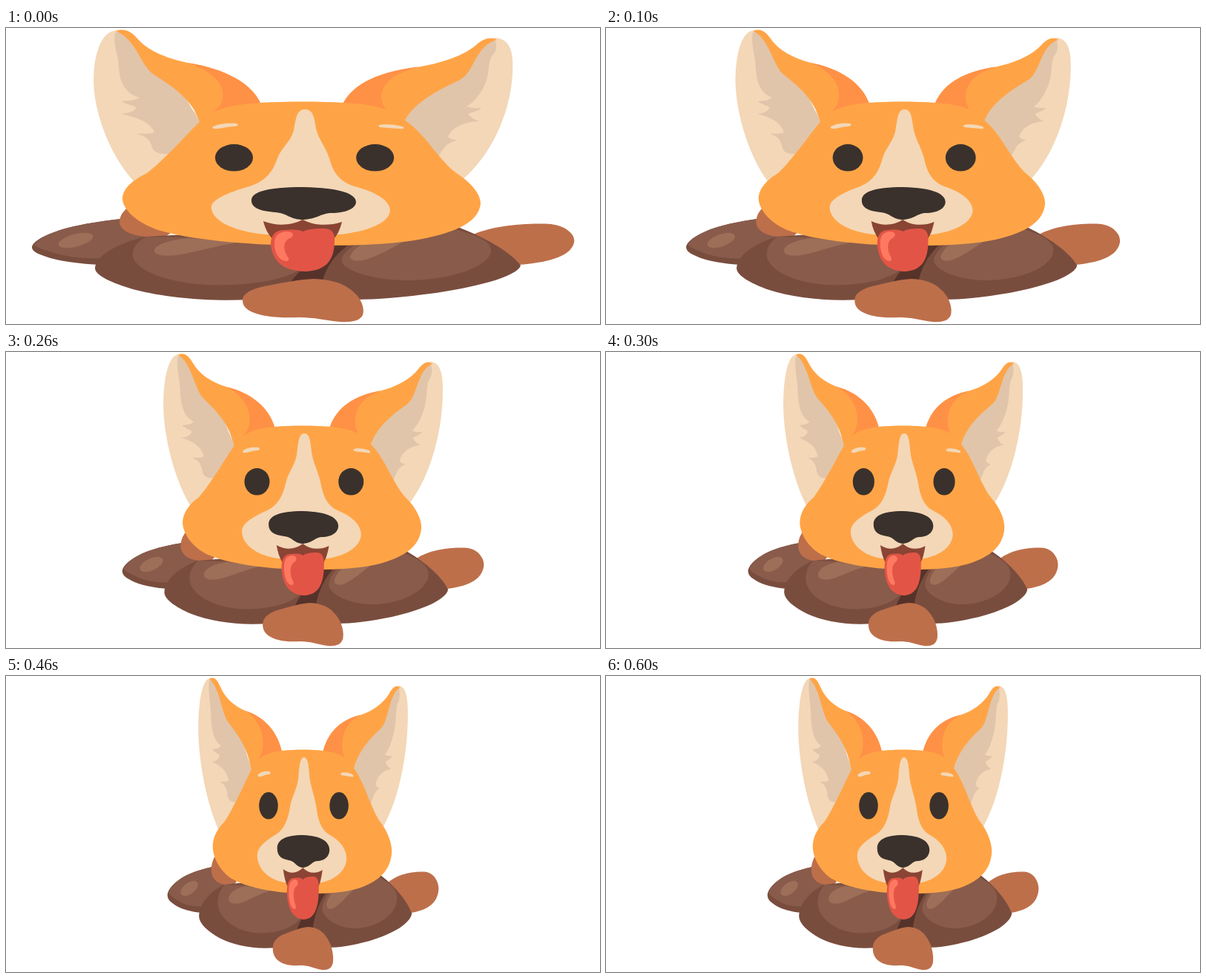
Animation, 801 px wide and 400 px high, one loop 700 ms. Source, as an HTML page with a canvas:

```html
<!DOCTYPE html>
<html lang="en">
<head>
<meta charset="utf-8">
<title>Puppy squeeze</title>
<style>
  html, body { margin: 0; width: 100%; height: 100%; overflow: hidden; background: #fff; }
  canvas { display: block; }
</style>
</head>
<body>
<canvas id="stage" width="801" height="400"></canvas>
<script>
const ctx = document.getElementById('stage').getContext('2d');
const W = 801, H = 400, STEP = 100, STEPS = 7;

const orange = '#ffa446', deepOrange = '#ff9147', cream = '#f3d7b7', shade = '#e0c5ab';
const soil = '#794d3e', soilLit = '#895b4b', soilShine = '#9d6f58', soilDark = '#56332a';
const rust = '#bd6f4a', black = '#3a312c', mouth = '#8a4434', tongue = '#e25546', tongueLit = '#ff7961';

const parts = [];
const add = (color, d) => parts.push([color, new Path2D(d)]);
function oval(color, x, y, rx, ry, turn = 0) {
  const p = new Path2D();
  p.ellipse(x, y, rx, ry, turn, 0, Math.PI * 2);
  parts.push([color, p]);
}

// Soil and stones
add(soil, 'M35 297C34 286 68 273 92 268C115 263 135 260 156 258L240 290L150 320C118 321 82 317 60 311C45 306 36 303 35 297Z');
add(soilLit, 'M38 293C44 283 70 273 92 268C115 263 135 260 156 258L230 290L150 309C115 314 84 310 65 304C50 299 42 297 38 293Z');
oval(soilShine, 94, 287, 24, 8.5, -0.25);
add(rust, 'M172 238C155 246 148 262 157 271C166 280 185 284 215 282L260 250Z');
add(rust, 'M626 281C650 268 700 263 735 265C757 268 768 280 766 290C762 306 740 316 692 320L640 310Z');
add(soil, 'M120 325C121 308 146 293 187 282L300 276L612 270C640 281 680 301 694 321C690 334 646 348 580 358C535 364 500 367 470 367L330 367C270 370 215 364 175 354C140 344 121 334 120 325Z');
add(soilLit, 'M189 282C174 290 168 302 172 312C181 330 220 344 270 347C318 349 366 343 392 329L410 285Z');
add(soilDark, 'M384 343C393 331 410 314 438 292L463 292C444 306 431 323 426 345Z');
add(soilLit, 'M480 288C462 296 450 309 453 317C462 331 503 342 548 341C598 339 640 326 652 308C659 293 648 284 606 272Z');
add(soilShine, 'M200 300C203 291 225 286 245 284L318 289C290 293 265 300 242 305C220 309 199 309 200 300Z');
add(soilShine, 'M464 309C466 302 474 295 484 291L536 289C520 297 502 308 485 313C474 316 464 315 464 309Z');
add(rust, 'M319 367C320 357 336 351 354 348C375 344 393 340 415 339C440 340 455 345 468 356C480 366 484 380 481 388C477 396 465 398 450 397C430 395 415 391 395 391C365 392 345 390 330 383C320 378 319 372 319 367Z');

// Left ear
add(cream, 'M152 3C128 2 118 36 118 72C119 118 142 174 172 207L265 150V125Z');
add(shade, 'M147 7C145 19 148 28 150 38C153 50 151 64 158 77C163 86 171 92 180 94C172 99 164 98 156 99C163 104 172 104 176 108C170 115 162 115 155 116C175 120 195 127 200 141C192 144 184 142 176 143C193 147 195 154 198 164C203 170 212 171 221 170C233 153 248 141 263 130L222 60L152 4Z');
add(orange, 'M148 4C160 0 169 5 176 13C190 30 216 41 245 47C296 55 331 75 343 101L300 130L262 130C252 95 222 78 198 62C180 48 176 16 148 4Z');
add(deepOrange, 'M245 47C296 55 331 75 343 101L279 113C293 105 295 91 290 79C283 64 265 54 245 47Z');

// Right ear
add(cream, 'M658 13C680 14 685 32 683 62C680 118 652 175 614 206L530 140Z');
add(shade, 'M659 15C663 26 661 32 655 38C649 48 653 62 645 78C638 92 630 101 621 106C628 109 635 108 641 108C636 113 629 113 623 116C627 122 633 124 638 126C616 127 601 135 596 147C600 151 604 151 608 151C600 155 594 156 590 163L583 173L535 126L570 75Z');
add(orange, 'M662 16C654 11 643 15 635 22C617 38 588 47 555 53C504 59 470 74 455 101L500 130L537 126C552 98 586 83 612 70C632 60 632 24 662 16Z');
add(deepOrange, 'M558 52C504 59 470 74 455 101L512 110C504 98 504 88 512 76C522 63 541 57 558 52Z');

// Head
add(orange, 'M343 101C380 99 420 99 455 101C494 103 519 109 535 123C565 140 584 182 613 200C630 212 640 226 640 237C638 265 598 279 550 287C506 294 450 294 400 294C320 293 248 286 205 273C174 262 157 244 157 230C158 215 174 204 190 196C212 180 240 147 264 124C281 108 310 103 343 101Z');
add(cream, 'M403 110C413 110 415 118 417 130C419 148 430 158 436 176C441 195 449 207 470 214C500 222 517 233 518 246C518 262 490 275 450 279L350 279C302 274 277 259 277 242C277 232 298 223 325 215C352 207 360 193 366 176C371 162 384 154 388 138C391 122 392 110 403 110Z');
add(cream, 'M278 134C285 129 300 128 310 129C315 130 313 133 308 133C298 133 288 137 280 136Z');
add(cream, 'M502 132C505 129 525 130 534 133C539 135 536 137 530 136C520 135 510 135 504 134Z');
oval(black, 307.5, 175.3, 25.5, 18.3);
oval(black, 497.7, 175.3, 25.5, 18.3);
add(mouth, 'M347 261C365 268 385 267 400 259C415 267 435 268 453 262C450 274 446 281 441 286L360 286C353 278 349 270 347 261Z');
add(tongue, 'M357 292C357 278 365 272 378 273C390 272 396 273 401 275C406 272 415 271 428 271C440 271 444 277 443 290C442 316 430 328 403 329C373 328 359 315 357 292Z');
add(tongueLit, 'M362 291C362 280 368 276 378 275C388 275 390 281 383 284C373 288 373 300 381 311C383 317 372 316 367 309C363 303 362 297 362 291Z');
add(black, 'M331 233C331 222 350 215 401 215C450 216 472 224 472 235C472 245 455 250 440 250C425 250 420 258 401 259C382 259 380 250 362 249C340 247 331 242 331 233Z');

// Width shrinks as 4/(4+n), then bounces back one step
function draw(time) {
  const n = Math.floor(time / STEP) % STEPS;
  const depth = n < 6 ? n : 4;
  ctx.setTransform(1, 0, 0, 1, 0, 0);
  ctx.fillStyle = '#fff';
  ctx.fillRect(0, 0, W, H);
  ctx.translate(W / 2, 0);
  ctx.scale(4 / (4 + depth), 1);
  ctx.translate(-W / 2, 0);
  for (const [color, path] of parts) {
    ctx.fillStyle = color;
    ctx.fill(path);
  }
}

let start;
function tick(now) {
  start ??= now;
  draw(now - start);
  requestAnimationFrame(tick);
}
draw(0);
requestAnimationFrame(tick);
</script>
</body>
</html>
```
